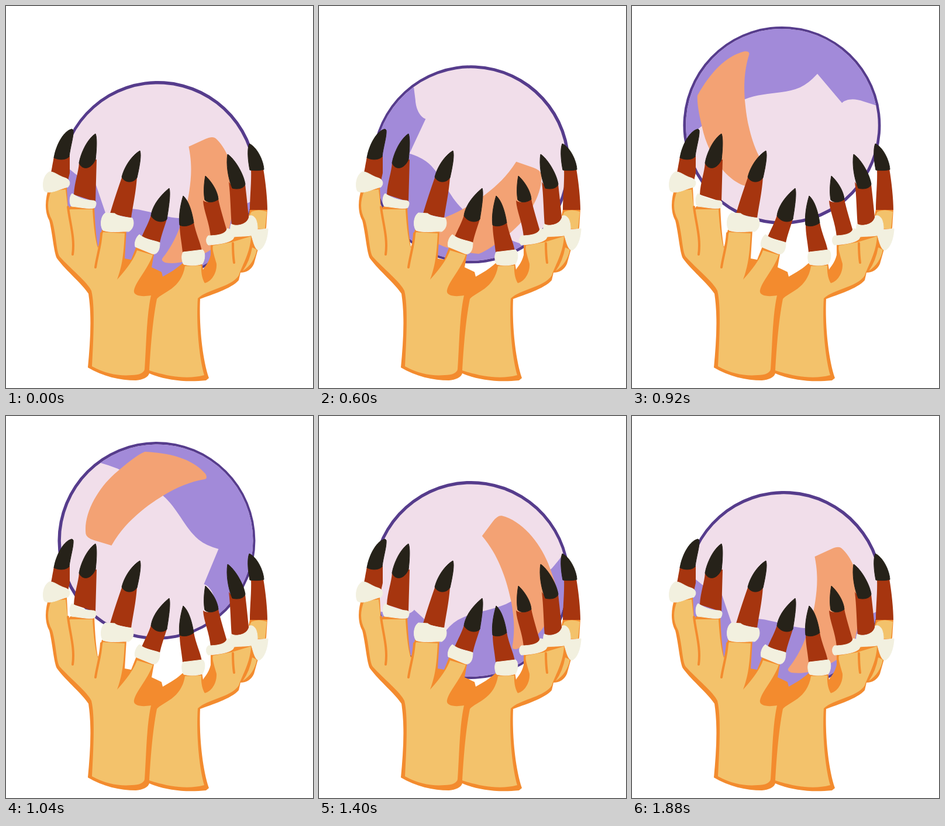
These frames come from a looping animation (525 px wide and 652 px high, 1920 ms). An HTML page:

```html
<!DOCTYPE html>
<html lang="en">
<head>
<meta charset="utf-8">
<title>Spinning ball in two hands</title>
<style>
  html, body { margin: 0; width: 100%; height: 100%; overflow: hidden; background: #fff; }
  svg { display: block; width: 100vw; height: 100vh; }
  .skin { fill: #f3c26b; }
  .edge { fill: #f38b2e; }
  .crease { fill: none; stroke: #f38b2e; stroke-width: 4; stroke-linecap: round; }
  .red { fill: #a6350f; }
  .nail { fill: #262219; stroke: #262219; stroke-width: 1; stroke-linejoin: round; }
  .cuff { fill: #f2f0df; stroke: #f2f0df; stroke-width: 1; stroke-linejoin: round; }
</style>
</head>
<body>
<svg viewBox="0 0 525 652">
  <defs><clipPath id="inside"><circle cx="0.7" cy="-0.3" r="164.3"/></clipPath></defs>

  <g id="ball">
    <circle r="169" fill="#563c8c"/>
    <g clip-path="url(#inside)">
      <circle r="169" fill="#f1deea"/>
      <path fill="#a28ad9" d="M-96,-133 Q-81,-129 -66,-123 L11,-77 C36,-56 48,-22 72,-2 Q84,8 106,14 L81,74
        C88,76 98,86 100,106 L104,129 L115,190 L220,100 V-220 H-130 Z"/>
      <path fill="#f3a274" d="M-77,8 C-62,-18 -46,-34 -27,-50 C-14,-61 0,-70 11,-77 C34,-91 58,-101 82,-105
        Q88,-106 84,-114 C62,-140 24,-150 -20,-152 C-34,-146 -50,-133 -72,-114 C-101,-88 -125,-46 -121,-12 Q-120,-5 -107,-1 Z"/>
    </g>
  </g>

  <path class="edge" d="M74,308 C66,330 66,352 74,366 C80,390 82,425 88,432 C102,451 131,475 141,491
    C147,530 144,575 140,617 C165,632 195,639 222,639 C234,638 243,634 245,627 C270,638 305,643 342,639 L347,635
    C335,600 330,540 332,500 C350,493 385,483 398,468 L401,455 C412,455 420,449 424,440 L431,415 L445,378 L447,347 H417
    L414,362 L400,385 L350,400 V425 C346,440 340,444 337,450 L335,438 H303 C290,450 280,455 268,462 L266,454 L249,446
    L254,418 L224,408 L214,433 L203,431 L206,382 H164 C160,395 162,405 157,411 C154,395 152,370 151,342 H110 L106,348 L104,310 Z"/>
  <path class="skin" d="M77,316 C70,335 70,350 79,366 C86,390 86,420 92,428 C110,448 140,472 146,486
    C152,510 150,560 147,615 C170,628 195,632 215,630 C228,630 236,626 237,620 C240,580 240,530 248,494
    C230,497 217,494 219,485 C222,470 242,450 251,425 L224,417 Q218,436 190,467 C198,445 201,428 203,388
    L166,386 L157,413 Q151,395 148,347 H111 L106,348 L102,313 Z"/>
  <path class="skin" d="M306,444 L334,443 C333,460 338,470 340,473 C352,470 361,455 360,440 C356,425 352,415 354,409
    L386,403 L419,393 C418,420 405,440 398,460 C385,480 345,483 328,499 C325,540 330,600 339,630
    C310,638 275,632 245,622 C247,590 250,540 258,500 C268,488 300,483 306,444 Z"/>
  <path class="skin" d="M420,351 Q432,346 446,351 L443,380 H426 Q430,366 417,356 Z M421,412 L429,416 Q424,440 405,452 Q417,435 421,412 Z"/>
  <path class="crease" d="M106,343 C109,370 118,395 114,424 M163,388 C162,410 156,425 153,446 M388,405 Q388,424 390,438"/>

  <g id="fingers"></g>
</svg>
<script>
// Each finger: red sleeve, black nail, pale cuff.
const fingers = [
  ['M82,257 L109,256 L109,285 L106,298 L76,290 Z',
   'M113,210 C100,212 86,235 82,259 C92,264 104,262 108,257 C110,240 116,222 115,212 Z',
   'M74,283 C62,290 62,310 66,316 C76,322 92,312 106,309 C112,302 108,295 100,293 C90,290 82,282 74,283 Z'],
  ['M125,267 L155,262 L153,334 L116,322 C117,300 124,285 125,267 Z',
   'M153,218 C140,226 128,250 125,268 C130,280 145,280 153,262 C155,245 156,225 153,218 Z',
   'M113,320 C108,325 108,338 112,342 C125,343 145,348 152,344 C156,336 154,332 148,332 C135,332 120,325 113,320 Z'],
  ['M199,290 L224,292 C222,320 217,340 214,362 L178,354 C185,330 192,310 199,290 Z',
   'M229,247 C215,255 202,275 198,292 C204,303 218,302 224,293 C228,275 232,255 229,247 Z',
   'M170,353 C162,358 160,375 166,383 C180,388 200,384 210,385 C218,380 220,370 216,362 C200,360 190,358 186,354 Z'],
  ['M248,357 L275,364 C270,380 266,390 263,404 L232,394 C238,380 244,370 248,357 Z',
   'M279,311 C262,325 250,342 248,358 C255,370 270,370 275,364 C278,345 282,320 279,311 Z',
   'M228,390 C222,395 219,405 221,411 L250,423 C258,425 263,418 263,404 C255,400 240,400 228,390 Z'],
  ['M297,372 L321,369 C325,390 332,402 335,418 L302,420 C300,400 297,390 297,372 Z',
   'M303,324 C298,340 295,360 297,374 C305,378 316,374 321,370 C318,350 312,332 303,324 Z',
   'M303,420 C299,425 301,438 304,441 C315,444 328,443 336,440 C342,430 340,418 336,416 Z'],
  ['M337,332 C345,338 358,334 363,329 C366,345 374,370 379,388 L350,394 C348,370 338,350 337,332 Z',
   'M341,290 C338,305 338,322 340,331 C346,337 356,335 363,330 C362,315 350,298 341,290 Z',
   'M346,392 C341,396 342,405 346,408 C360,407 380,405 388,398 C394,390 388,380 378,380 C376,390 360,392 346,392 Z'],
  ['M381,300 C390,315 405,310 409,304 C412,330 414,350 416,370 L386,376 C384,350 384,325 381,300 Z',
   'M379,253 C376,270 380,295 387,311 C398,314 408,310 409,304 C406,285 390,260 379,253 Z',
   'M385,372 C382,380 384,392 390,394 C405,392 425,395 430,385 C431,365 425,356 416,358 C415,372 395,378 385,372 Z'],
  ['M419,278 L440,278 C444,300 447,330 447,348 L417,348 C417,325 420,300 419,278 Z',
   'M416,235 C412,245 414,265 417,280 C425,281 435,281 441,279 C440,262 428,240 416,235 Z',
   'M417,385 C425,380 435,382 448,380 C447,400 440,415 432,417 C424,415 422,395 417,385 Z']
];
document.getElementById('fingers').innerHTML = fingers.map(([red, nail, cuff]) =>
  `<path class="red" d="${red}"/><path class="nail" d="${nail}"/><path class="cuff" d="${cuff}"/>`).join('');

const LOOP = 1920, STEP = 40, PEAK = LOOP / 2;
const ball = document.getElementById('ball');

// Drop below the highest point, by time away from the peak.
const drop = [[0, 0], [80, 18], [160, 37], [280, 60], [400, 81], [640, 97.7], [960, 102]];

const slope = i => {
  const a = drop[Math.max(i - 1, 0)], b = drop[Math.min(i + 1, drop.length - 1)];
  return i === drop.length - 1 ? 0 : (b[1] - a[1]) / (b[0] - a[0]);
};

function dropAt(away) {
  const i = Math.max(1, drop.findIndex(p => p[0] >= away));
  const [x0, y0] = drop[i - 1], [x1, y1] = drop[i];
  const w = x1 - x0, s = (away - x0) / w, r = 1 - s;
  return y0 * r * r * (1 + 2 * s) + y1 * s * s * (3 - 2 * s)
    + w * s * r * (slope(i - 1) * r - slope(i) * s);
}

function draw(time) {
  const t = Math.floor((time % LOOP) / STEP) * STEP;
  const away = Math.abs(t - PEAK);
  const turn = Math.sign(t - PEAK) * 180 * (1 - (1 - away / PEAK) ** 3) - 41.4;
  const x = 260 - 4 * Math.exp(-((away / 120) ** 2));
  const y = 195 + dropAt(away);
  ball.setAttribute('transform', `translate(${x} ${y}) rotate(${turn})`);
}

const start = performance.now();
function tick() {
  draw(performance.now() - start);
  requestAnimationFrame(tick);
}
tick();
</script>
</body>
</html>
```
